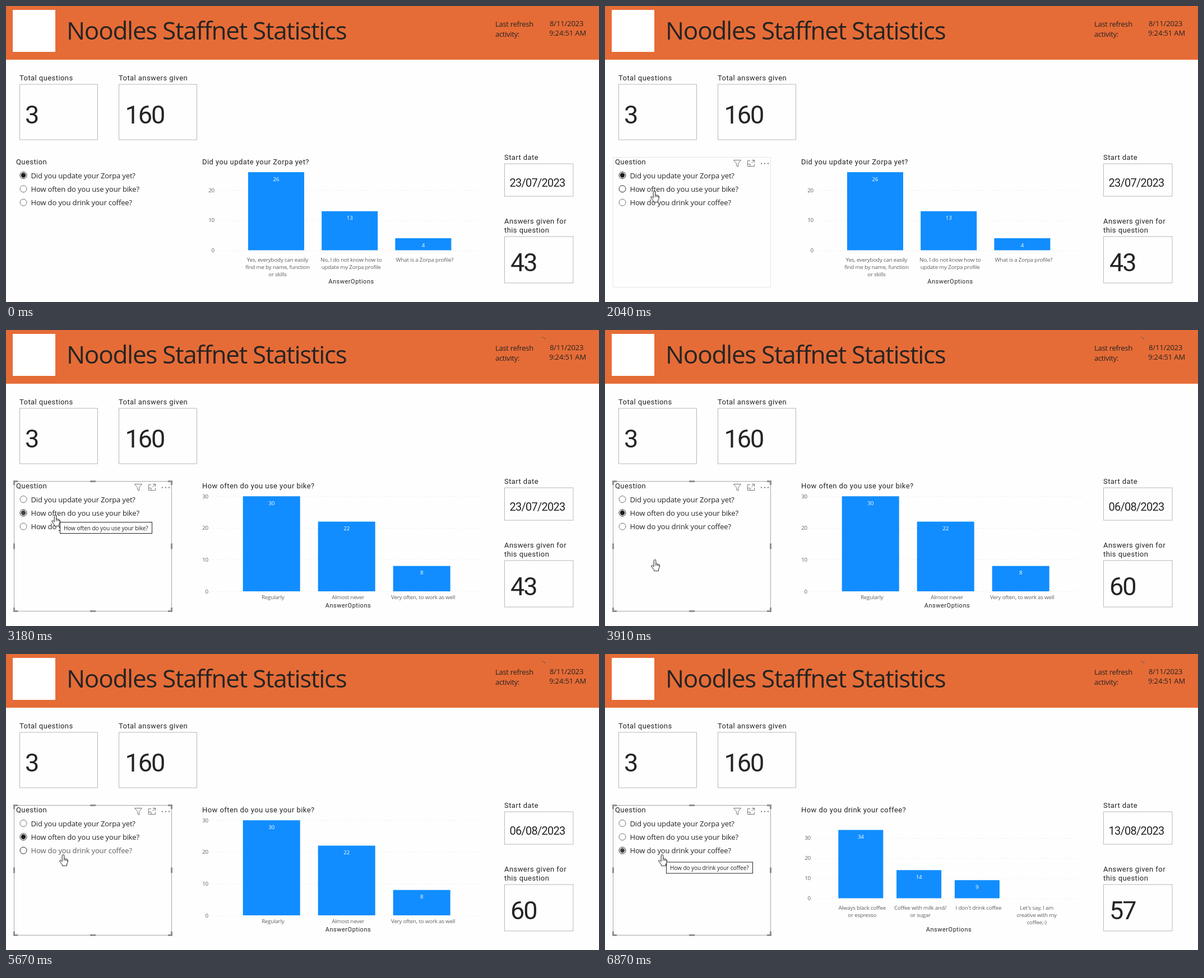
Recreate the animation shown at these times as an HTML page. Size 1058 px wide and 529 px high, loop 8000 ms.

```html
<!DOCTYPE html>
<html lang="en">
<head>
<meta charset="utf-8">
<title>Survey dashboard</title>
<style>
html, body { margin: 0; width: 100%; height: 100%; overflow: hidden; background: #fefefe; }
svg { display: block; width: 1058px; height: 529px; }
text { font: 13px "Open Sans", "Noto Sans", sans-serif; letter-spacing: -.14px; fill: #252423; }
.title { font-size: 44px; letter-spacing: -1.3px; }
.refresh { letter-spacing: -.3px; }
.head { font-family: Roboto, Arial, sans-serif; letter-spacing: .43px; }
.big { font: 45px Roboto, Arial, sans-serif; letter-spacing: -2px; }
.date { font: 20px Roboto, Arial, sans-serif; letter-spacing: -.75px; }
.axis { font: 11px Roboto, Arial, sans-serif; letter-spacing: .5px; text-anchor: middle; }
.tick, .cat, .val { font-size: 9.8px; letter-spacing: -.2px; fill: #605e5c; text-anchor: middle; }
.tick { text-anchor: end; }
.val { fill: #fff; }
.tip text { font-size: 10px; letter-spacing: -.05px; }
.tip rect { fill: #fff; stroke: #252423; }
.box { fill: none; stroke: #b8b8b8; }
.grid { stroke: #dcdad8; stroke-dasharray: 1 5; }
.bars { fill: #118dff; }
.icons { fill: none; stroke: #777; }
.ring { fill: #fff; stroke: #707070; }
.dot { fill: #1c1b1a; }

/* Every part runs on the same eight second loop. */
.a { animation: 8s step-end infinite; }
.hover { animation-name: hover; }
.picked { animation-name: picked; }
.s0 { animation-name: s0; } .s1 { animation-name: s1; } .s2 { animation-name: s2; }
.c0 { animation-name: c0; } .c1 { animation-name: c1; } .c2 { animation-name: c2; }
.m0 { animation-name: m0; } .m1 { animation-name: m1; } .m2 { animation-name: m2; }
.r0 { animation-name: r0; } .r1 { animation-name: r1; } .r2 { animation-name: r2; }
.q1 { animation-name: q1; } .q2 { animation-name: q2; }
.tip1 { animation-name: tip1; } .tip2 { animation-name: tip2; }
.grow1 { animation-name: grow1; transform-origin: 0 467px; }
.grow2 { animation-name: grow2; transform-origin: 0 436.5px; }
.cursor { animation-name: cursor; }

@keyframes hover { 0% { opacity: 0 } 15.5%, 100% { opacity: 1 } }
@keyframes picked { 0% { opacity: 0 } 35.5%, 100% { opacity: 1 } }
/* selected option */
@keyframes s0 { 0% { opacity: 1 } 35.5%, 100% { opacity: 0 } }
@keyframes s1 { 0% { opacity: 0; fill: #404040 } 35.5% { opacity: 1; fill: #404040 } 45.5% { opacity: 1; fill: #1c1b1a } 77.5%, 100% { opacity: 0 } }
@keyframes s2 { 0% { opacity: 0; fill: #404040 } 77.5%, 100% { opacity: 1; fill: #404040 } }
/* chart */
@keyframes c0 { 0% { opacity: 1 } 38.125%, 100% { opacity: 0 } }
@keyframes c1 { 0% { opacity: 0 } 38.125% { opacity: 1 } 81.75%, 100% { opacity: 0 } }
@keyframes c2 { 0% { opacity: 0 } 81.75%, 100% { opacity: 1 } }
@keyframes grow1 { 0% { transform: scaleY(.4) } 38.875% { transform: scaleY(.85) } 39.75%, 100% { transform: none } }
@keyframes grow2 { 0% { transform: scaleY(.4) } 82.5% { transform: scaleY(.85) } 83.375%, 100% { transform: none } }
/* cards on the right */
@keyframes m0 { 0% { opacity: 1 } 40.5%, 100% { opacity: 0 } }
@keyframes m1 { 0% { opacity: 0 } 40.5% { opacity: 1 } 83.375%, 100% { opacity: 0 } }
@keyframes m2 { 0% { opacity: 0 } 83.375%, 100% { opacity: 1 } }
/* radio rings and option text */
@keyframes r0 { 0% { stroke: #252423 } 35.5%, 100% { stroke: #707070 } }
@keyframes r1 { 0% { stroke: #707070 } 25.5% { stroke: #252423 } 77.5%, 100% { stroke: #707070 } }
@keyframes r2 { 0% { stroke: #707070 } 70%, 100% { stroke: #252423 } }
@keyframes q1 { 0% { fill: #252423 } 26.25% { fill: #605e5c } 38.125%, 100% { fill: #252423 } }
@keyframes q2 { 0% { fill: #252423 } 70% { fill: #605e5c } 82.5%, 100% { fill: #252423 } }
@keyframes tip1 { 0% { opacity: 0 } 39.75% { opacity: 1 } 45.5%, 100% { opacity: 0 } }
@keyframes tip2 { 0% { opacity: 0 } 85.875%, 100% { opacity: 1 } }
@keyframes cursor {
  0% { opacity: 0; transform: translate(17px, 480px) }
  15.5% { opacity: 1; transform: translate(17px, 480px); animation-timing-function: steps(8, end) }
  22.25% { opacity: 1; transform: translate(88px, 330.5px) }
  44.7% { opacity: 1; transform: translate(88px, 330.5px); animation-timing-function: steps(5, end) }
  48.875% { opacity: 1; transform: translate(89px, 410.5px) }
  64.75% { opacity: 1; transform: translate(89px, 410.5px); animation-timing-function: steps(7, end) }
  70.875%, 100% { opacity: 1; transform: translate(102px, 358.5px) }
}
</style>
</head>
<body>
<svg viewBox="0 0 1058 529">
  <rect width="1058" height="96" fill="#e66c37"/>
  <rect x="12" y="7" width="76" height="75" fill="#fff"/>
  <text class="title" x="108" y="60">Noodles Staffnet Statistics</text>
  <text class="refresh" x="873" y="37">Last refresh</text>
  <text class="refresh" x="873" y="55">activity:</text>
  <text x="970" y="36">8/11/2023</text>
  <text x="969" y="53">9:24:51 AM</text>
  <path class="a picked" d="M955 13h4l3 4m-3-2h4" fill="none" stroke="#6b5a58" stroke-opacity=".7"/>

  <text class="head" x="24" y="132.5">Total questions</text>
  <rect class="box" x="24.5" y="140" width="139" height="99"/>
  <text class="big" x="34" y="210">3</text>
  <text class="head" x="201" y="132.5">Total answers given</text>
  <rect class="box" x="201.5" y="140" width="139" height="99"/>
  <text class="big" x="212.5" y="210">160</text>

  <text class="head" x="889" y="275">Start date</text>
  <rect class="box" x="889.5" y="282" width="122.500" height="58"/>
  <text class="head" x="889" y="388.500">Answers given for</text>
  <text class="head" x="889" y="405">this question</text>
  <rect class="box" x="889.5" y="412" width="122.500" height="83"/>
  <g id="cards"></g>
  <g id="charts"></g>

  <rect class="a hover" x="14.500" y="270.500" width="281" height="232" fill="none" stroke="#e6e6e6"/>
  <g class="a picked" fill="none" stroke="#a6a6a6">
    <rect x="14.500" y="270.500" width="281" height="232"/>
    <path stroke="#8f8f8f" stroke-width="3" d="M14.500 277v-6.500h6.500M289 270.500h6.500v6.500M295.500 496v6.500h-6.500M21 502.500h-6.500v-6.500M150 270.500h10M150 502.500h10M14.500 381.500v10M295.500 381.500v10"/>
  </g>
  <g class="a hover icons">
    <path d="M229.500 275.500h13l-5 6v6l-3-2v-4z"/>
    <path d="M259 276.500h-4.500v10h12v-4M262 275.500h4.500v4.500M266.500 275.500l-5 5M254.500 282.500h4.500v4"/>
    <path d="M278 281.500h2m4 0h2m4 0h2" stroke-width="2"/>
  </g>
  <text class="head" x="18" y="282.500">Question</text>
  <g id="options"></g>
  <g id="tips"></g>

  <g class="a cursor" stroke="#1a1a1a" stroke-linejoin="round">
    <path fill="#fff" d="M-1.800 12.500V1.800A1.800 1.800 0 0 1 1.800 1.800V7.500Q3.500 6.400 4.600 8Q6.200 7 7 8.800Q8.600 8.600 8.400 11Q8.400 15 6.500 17V20H-1.500V18.200L-6.200 12Q-6.600 9.600 -4.200 10.200Z"/>
    <path fill="none" d="M1.800 7.500v3.500M4.600 8v3M7 9v2.500"/>
  </g>
</svg>
<script>
const $ = id => document.getElementById(id);
const text = (cls, x, y, s) => `<text class="${cls}" x="${x}" y="${y}">${s}</text>`;

const questions = [
  "Did you update your Zorpa yet?",
  "How often do you use your bike?",
  "How do you drink your coffee?"
];

// base and unit: zero line and pixels per answer; left: start of the grid
const charts = [
  { base: 436.5, unit: 5.365, left: 380, ticks: [0, 10, 20], x: 432, step: 131.2, width: 100,
    mid: 616, values: [26, 13, 4], cats: [
      ["Yes, everybody can easily", "find me by name, function", "or skills"],
      ["No, I do not know how to", "update my Zorpa profile"],
      ["What is a Zorpa profile?"]] },
  { base: 467, unit: 5.66, left: 369, ticks: [0, 10, 20, 30], x: 422.7, step: 134, width: 102,
    mid: 610.5, values: [30, 22, 8], cats: [
      ["Regularly"], ["Almost never"], ["Very often, to work as well"]] },
  { base: 436.5, unit: 3.59, left: 375, ticks: [0, 10, 20, 30], x: 416.3, step: 103.8, width: 80,
    mid: 613.5, values: [34, 14, 9, 0], cats: [
      ["Always black coffee", "or espresso"], ["Coffee with milk and/", "or sugar"],
      ["I don't drink coffee"], ["Let's say, I am", "creative with my", "coffee;-)"]] }
];

function drawChart(c, i) {
  let grid = "", bars = "", labels = "";
  for (const n of c.ticks) {
    const y = c.base - n * c.unit;
    grid += `<path class="grid" d="M${c.left} ${Math.round(y) + .5}H852"/>` + text("tick", c.left - 8, y + 3.5, n);
  }
  c.values.forEach((v, k) => {
    const x = c.x + k * c.step, h = v * c.unit, center = x + c.width / 2;
    bars += `<rect x="${x}" y="${c.base - h}" width="${c.width}" height="${h}"/>`;
    if (v) labels += text("val", center, c.base - h + 15.5, v);
    c.cats[k].forEach((line, row) => {
      labels += text("cat", center + 2.5, c.base + 20 + row * 13.3 - (i === 1 ? 6 : 0), line);
    });
  });
  return `<g class="a c${i}">${text("head", 350, 282.5, questions[i])}${grid}
    <g class="bars a grow${i}">${bars}</g>${labels}${text("axis", c.mid, 496, "AnswerOptions")}</g>`;
}

const drawOption = (q, i) => {
  const y = 302.5 + i * 24.3;
  return `<circle class="ring a r${i}" cx="31" cy="${y}" r="6"/>
    <circle class="dot a s${i}" cx="31" cy="${y}" r="4.2"/>` + text(`a q${i}`, 44.5, y + 5, q);
};

const drawCards = ([date, count], i) =>
  `<g class="a m${i}">${text("date", 898.5, 322.5, date)}${text("big", 900, 474, count)}</g>`;

const drawTip = (i, x, y, w) =>
  `<g class="a tip tip${i}"><rect x="${x}" y="${y}" width="${w}" height="20"/>${text("", x + 6.5, y + 14, questions[i])}</g>`;

$("charts").innerHTML = charts.map(drawChart).join("");
$("options").innerHTML = questions.map(drawOption).join("");
$("cards").innerHTML = [["23/07/2023", 43], ["06/08/2023", 60], ["13/08/2023", 57]].map(drawCards).join("");
$("tips").innerHTML = drawTip(1, 96.5, 343.5, 164) + drawTip(2, 109.5, 372, 154);
</script>
</body>
</html>
```
